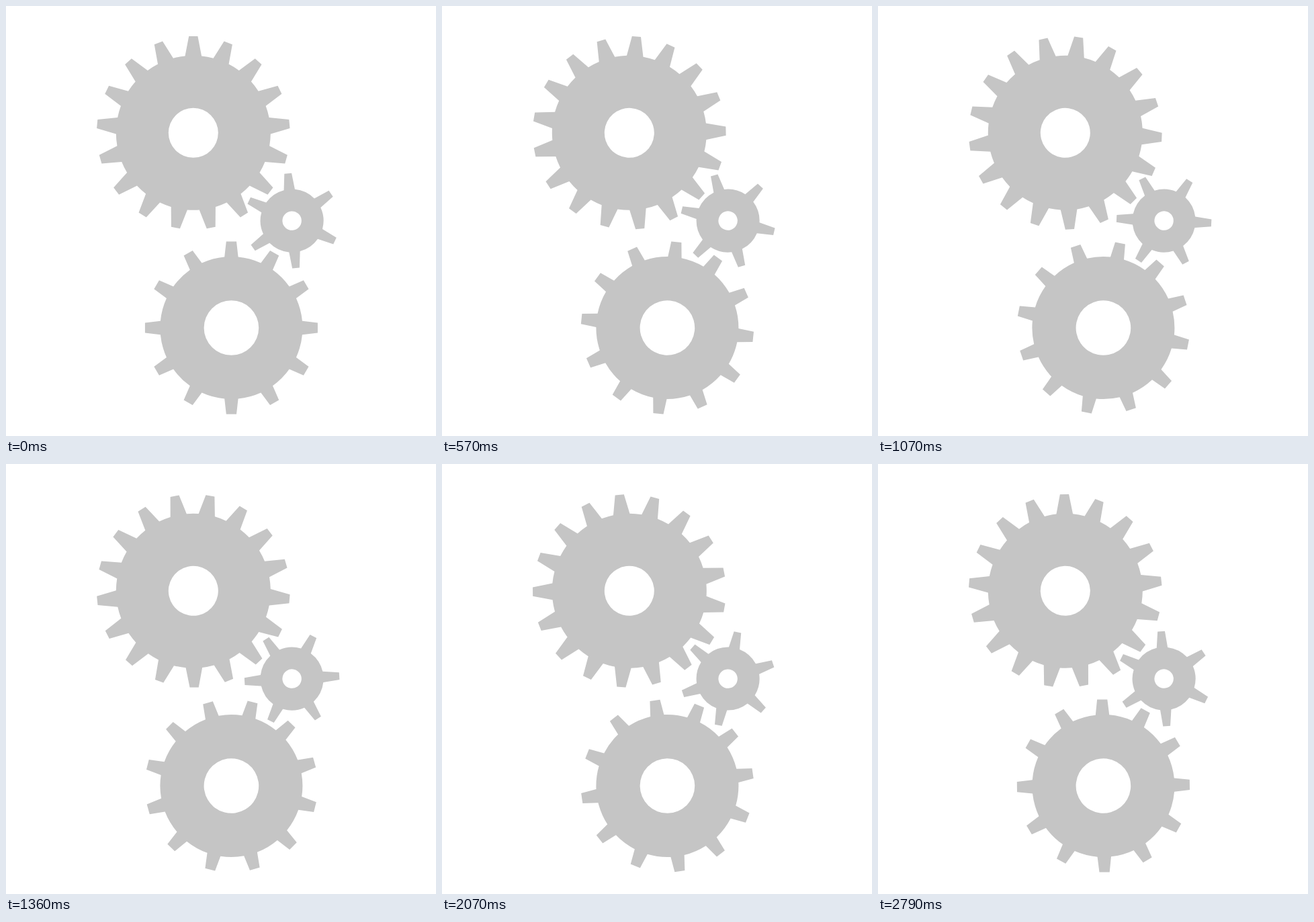
Recreate the animation shown at these times as an HTML page. Size 640 px wide and 640 px high, loop 2.87 s.

```html
<!DOCTYPE html>
<html lang="en">
<head>
<meta charset="utf-8">
<title>Gears</title>
<style>
html, body { margin: 0; width: 100%; height: 100%; overflow: hidden; background: #fff; }
svg { display: block; width: 100%; height: 100%; fill: #c5c5c5; }
</style>
</head>
<body>
<svg id="stage" viewBox="0 0 640 640"></svg>
<script>
const LOOP = 2870, STEPS = 40, FPS = 14;

// r: body, tip: outer radius, hole: bore, a/b: half tooth width at tip and base
const gears = [
  { x: 278.8, y: 188.8, teeth: 17, r: 115, tip: 143.7, hole: 37, a: 6.6, b: 12.3, start: 0, dir: 1 },
  { x: 425.6, y: 319.6, teeth: 6, r: 47, tip: 70.6, hole: 14.2, a: 5.4, b: 8.2, start: -4.8, dir: -1 },
  { x: 335.4, y: 479, teeth: 12, r: 106, tip: 128.5, hole: 40.8, a: 7.6, b: 10.2, start: 0, dir: 1 }
];

const circle = r => `M${-r} 0A${r} ${r} 0 1 1 ${r} 0A${r} ${r} 0 1 1 ${-r} 0Z`;

function outline({ teeth, r, tip, hole, a, b }) {
  const base = Math.sqrt(r * r - b * b);
  let d = "";
  for (let i = 0; i < teeth; i++) {
    const t = i / teeth * 2 * Math.PI, c = Math.cos(t), s = Math.sin(t);
    const at = (x, y) => `${(x * c - y * s).toFixed(2)} ${(x * s + y * c).toFixed(2)}`;
    d += `${i ? "L" : "M"}${at(-b, -base)}L${at(-a, -tip)}L${at(a, -tip)}L${at(b, -base)}`;
    const n = (i + 1) / teeth * 2 * Math.PI, nc = Math.cos(n), ns = Math.sin(n);
    d += `A${r} ${r} 0 0 1 ${(-b * nc + base * ns).toFixed(2)} ${(-b * ns - base * nc).toFixed(2)}`;
  }
  return d + "Z" + circle(hole);
}

const stage = document.getElementById("stage");
for (const g of gears) {
  g.el = document.createElementNS("http://www.w3.org/2000/svg", "path");
  g.el.setAttribute("d", outline(g));
  g.el.setAttribute("fill-rule", "evenodd");
  stage.append(g.el);
}

// Each loop advances every gear by one tooth, in 14 steps per second on a 10 ms clock.
function draw() {
  const t = Math.floor(performance.now() % LOOP / 10) * 10;
  const step = Math.min(STEPS - 1, Math.floor((t + 5) * FPS / 1000));
  for (const g of gears) {
    const turn = g.start + g.dir * 360 / g.teeth * step / STEPS;
    g.el.setAttribute("transform", `translate(${g.x} ${g.y}) rotate(${turn})`);
  }
  requestAnimationFrame(draw);
}
draw();
</script>
</body>
</html>
```
